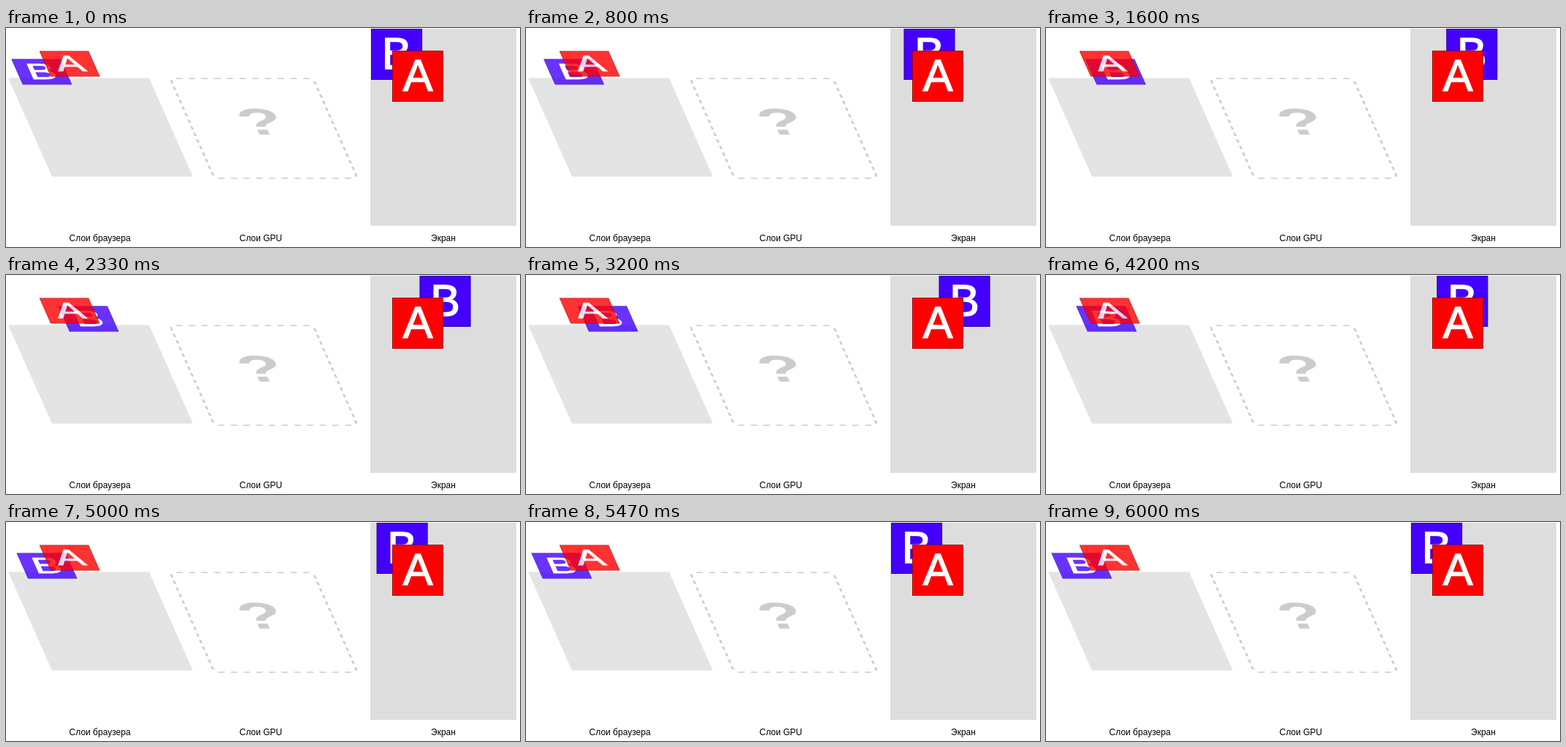
These frames come from a looping animation (704x300 px, 6070 ms). An HTML page:

```html
<!DOCTYPE html>
<html lang="ru">
<head>
<meta charset="utf-8">
<style>
  html, body { margin: 0; height: 100%; overflow: hidden; background: #fff; }
  svg { display: block; }
  text { font: 12px "Liberation Sans", Arial, sans-serif; text-anchor: middle; }
  .letter { font-size: 61px; fill: #fff; stroke: #fff; stroke-width: 1.5px; }
  .question { font-size: 102px; font-weight: bold; fill: #ccc; }
  .edge { fill: none; stroke: #000; stroke-opacity: .35; }
</style>
</head>
<body>
<svg width="704" height="300" viewBox="0 0 704 300">
  <defs>
    <rect id="edge" class="edge" x=".5" y=".5" width="69" height="69"/>
    <g id="a">
      <rect width="70" height="70" fill="#f00"/>
      <use href="#edge"/>
      <text class="letter" x="35" y="54.5">A</text>
    </g>
    <g id="b">
      <rect width="70" height="70" fill="#40f"/>
      <use href="#edge"/>
      <text class="letter" x="35" y="54.5">B</text>
    </g>
  </defs>

  <!-- Browser layers: tilted plane with two raised tiles -->
  <rect width="200" height="270" fill="#e4e4e4" transform="matrix(.965 0 .2222 .5 3 68.5)"/>
  <g transform="matrix(.965 0 .2222 .5 6.2 42.5)" opacity=".8">
    <use href="#b" class="mover"/>
  </g>
  <g transform="matrix(.965 0 .2222 .5 10 16.5)" opacity=".8">
    <use href="#a" x="30" y="30"/>
  </g>

  <!-- GPU layers: empty dashed plane -->
  <g transform="matrix(.965 0 .2222 .5 223 68.5)">
    <rect x="1.5" y="1.5" width="203" height="273" rx="8.5" fill="none"
          stroke="#ccc" stroke-width="3" pathLength="104" stroke-dasharray="1 1"/>
    <text class="question" x="102.3" y="155.5">?</text>
  </g>

  <!-- Screen -->
  <g transform="translate(499 1)">
    <rect width="200" height="270" fill="#ddd"/>
    <use href="#b" class="mover"/>
    <use href="#a" x="30" y="30"/>
  </g>

  <text x="128.6" y="292">Слои браузера</text>
  <text x="349" y="292">Слои GPU</text>
  <text x="599" y="292">Экран</text>
</svg>
<script>
  const LOOP = 6070, HALF = 3000, LEAD = 268, STEP = 1000 / 15, TRAVEL = 70;
  const movers = document.querySelectorAll('.mover');

  const bezier = (s, p1, p2) =>
    3 * s * (1 - s) ** 2 * p1 + 3 * s * s * (1 - s) * p2 + s ** 3;

  // cubic-bezier(.42, 0, .58, 1)
  function easeInOut(x) {
    let low = 0, high = 1;
    for (let i = 0; i < 20; i++) {
      const mid = (low + high) / 2;
      if (bezier(mid, .42, .58) < x) low = mid; else high = mid;
    }
    return bezier(low, 0, 1);
  }

  function draw() {
    const t = performance.now() % LOOP;
    const stepped = Math.floor((t + 4) / STEP) * STEP;
    const phase = ((stepped + LEAD) / HALF) % 2;
    const x = TRAVEL * easeInOut(phase < 1 ? phase : 2 - phase);
    for (const mover of movers) mover.setAttribute('x', x.toFixed(2));
    requestAnimationFrame(draw);
  }
  draw();
</script>
</body>
</html>
```
